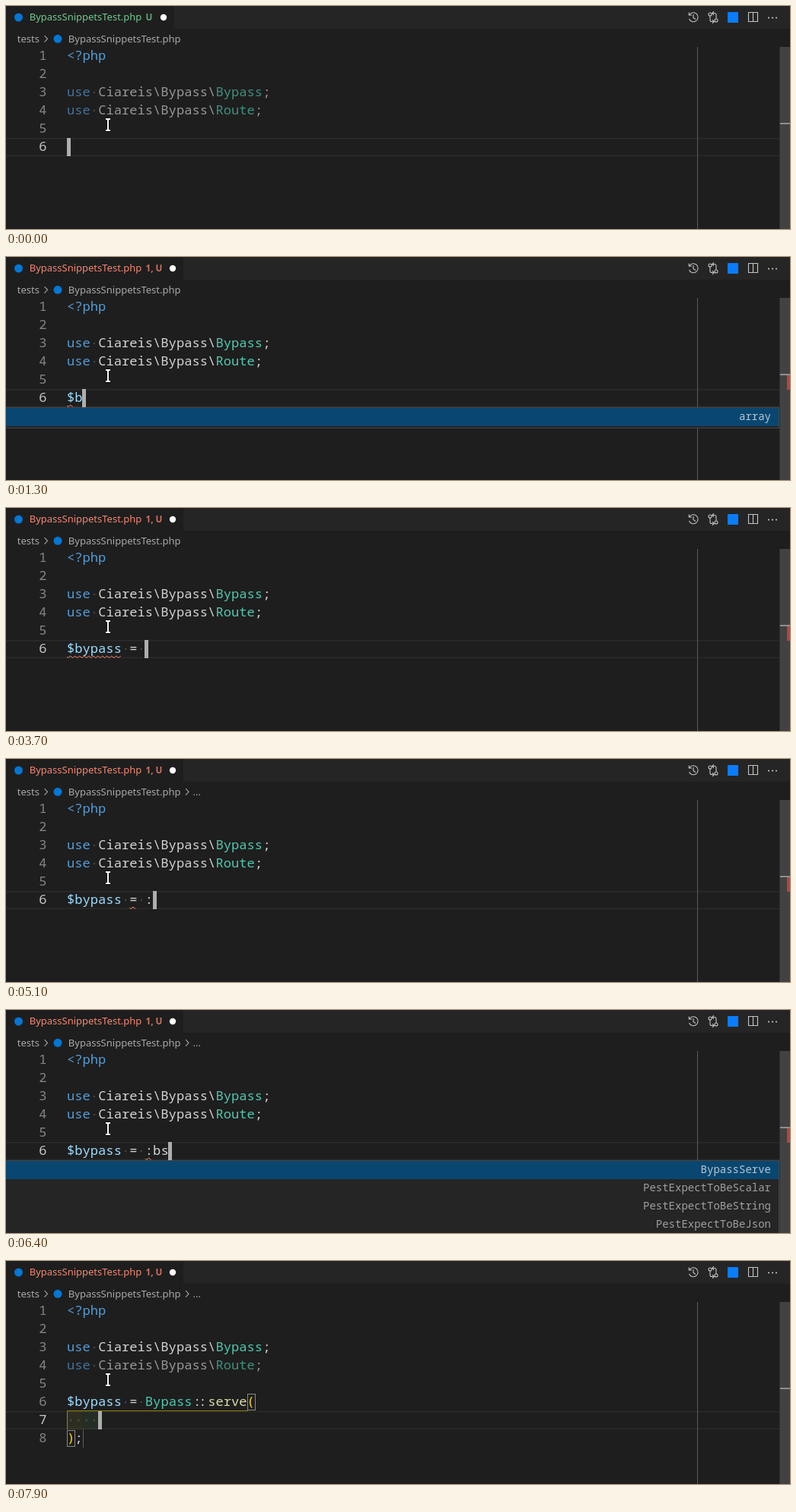
An HTML page with a canvas for the animation above (8 s loop, 1030 px wide and 294 px high).

```html
<!DOCTYPE html>
<html lang="en">
<head>
<meta charset="utf-8">
<title>Editor snippet</title>
<style>
html, body { margin: 0; width: 100%; height: 100%; overflow: hidden; background: #1e1e1e; }
canvas { display: block; }
</style>
</head>
<body>
<canvas id="stage" width="1030" height="294"></canvas>
<script>
const ctx = document.getElementById('stage').getContext('2d');
const LOOP = 8000, LEFT = 80, COL = 10.285, TOP = 54, ROW = 24, BASE = 17;
const CODE = '17.14px "Noto Sans Mono", monospace';
const LIST = '14px "Noto Sans Mono", monospace';
const UI = '13px "Noto Sans", sans-serif';
const BADGE = '600 11.7px "Noto Sans", sans-serif';
const C = {
  bg: '#1e1e1e', bar: '#252526', key: '#569cd6', text: '#d4d4d4', type: '#4ec9b0',
  variable: '#9cdcfe', call: '#dcdcaa', gold: '#ffd700', icon: '#c5c5c5',
  crumb: '#a9a9a9', error: '#f48771', added: '#73c991', logo: '#0277d4'
};

// Timelines: each entry holds from its time until the next one.
const typed = [
  [0, ''], [500, '$'], [1200, '$b'], [1500, '$by'], [2100, '$byp'], [2200, '$bypa'],
  [2400, '$bypas'], [2600, '$bypass'], [3300, '$bypass '], [3600, '$bypass ='],
  [3700, '$bypass = '], [5100, '$bypass = :'], [5800, '$bypass = :b'], [6400, '$bypass = :bs']
];
const waves = [[0, null], [1000, [0, 1]], [3100, [0, 7]], [4500, [8, 9]], [5600, [10, 11]], [7100, null]];
const routes = ['BypassRouteNotFound', 'BypassRouteOk', 'BypassServe'];
const menus = [
  [0, null],
  [600, { items: Array(4).fill('array') }],
  [1300, { items: ['array'] }],
  [1500, null],
  [5200, { items: [...routes, 'afterAll'], thumb: 45 }],
  [5800, { items: [...routes, 'beforeAll'], thumb: 70 }],
  [6400, { items: ['BypassServe', 'PestExpectToBeScalar', 'PestExpectToBeString', 'PestExpectToBeJson'] }],
  [7100, null]
];

const valueAt = (list, t) => list.filter(e => e[0] <= t).pop()[1];
const colX = n => LEFT + n * COL;
const rowY = line => TOP + (line - 1) * ROW;

function rect(x, y, w, h, color) {
  ctx.fillStyle = color;
  ctx.fillRect(x, y, w, h);
}

function text(s, x, y, font, color, align = 'left') {
  ctx.font = font;
  ctx.textAlign = align;
  ctx.fillStyle = color;
  ctx.fillText(s, x, y);
}

function disc(x, y, r, color) {
  ctx.fillStyle = color;
  ctx.beginPath();
  ctx.arc(x, y, r, 0, 7);
  ctx.fill();
}

function stroke(path, color = C.icon, width = 1.1) {
  ctx.strokeStyle = color;
  ctx.lineWidth = width;
  ctx.stroke(new Path2D(path));
}

function code(s, line, col, color) {
  text(s, colX(col), rowY(line) + BASE, CODE, color);
}

function spaceDot(line, col) {
  disc(colX(col + 0.5), rowY(line) + 12, 1.2, 'rgba(227,228,226,.2)');
}

function lineNumber(n, active) {
  text(n, 53.5, rowY(n) + BASE, CODE, active ? '#c6c6c6' : '#858585', 'right');
}

function importLine(line, name, dim) {
  ctx.globalAlpha = dim ? 0.667 : 1;
  code('use', line, 0, C.key);
  code('Ciareis\\Bypass\\', line, 4, C.text);
  code(name, line, 19, C.type);
  code(';', line, 19 + name.length, C.text);
  ctx.globalAlpha = 1;
  spaceDot(line, 3);
}

function statement(s) {
  code(s.slice(0, 7), 6, 0, C.variable);
  if (s.length > 7) spaceDot(6, 7);
  if (s.length > 8) code('=', 6, 8, C.text);
  if (s.length > 9) spaceDot(6, 9);
  code(s.slice(10), 6, 10, C.text);
}

function squiggle([from, to]) {
  const start = colX(from), end = colX(to);
  let path = `M${start} 196`;
  for (let x = start + 1.75, low = true; x <= end; x += 3, low = !low) path += `L${x} ${low ? 197.5 : 195.2}`;
  stroke(path, C.error, 1);
}

function tabBar(failing) {
  const end = failing ? 233 : 221, color = failing ? C.error : C.added;
  rect(0, 0, 1030, 30, C.bar);
  rect(0, 0, end, 30, C.bg);
  disc(16.5, 15, 5.5, C.logo);
  text('BypassSnippetsTest.php', 30.7, 19.3, UI, color);
  ctx.globalAlpha = 0.8;
  text(failing ? '1, U' : 'U', 183.5, 19, BADGE, color);
  ctx.globalAlpha = 1;
  disc(end - 14, 15, 4.2, '#fff');
}

function toolbar() {
  stroke('M898 11.5A6 6 0 1 1 897.5 17M897.3 8.5V12H901M903 11V15.5L906 17.5');
  stroke('M925 13V18.5Q925 20.5 927 20.5H929.5M928 18.2L930.3 20.5L928 22.8' +
         'M933 17V11.5Q933 9.5 931 9.5H928.5M930 7.2L927.7 9.5L930 11.8');
  stroke('M927 11A2 2 0 1 1 923 11A2 2 0 1 1 927 11M935 19A2 2 0 1 1 931 19A2 2 0 1 1 935 19');
  rect(948, 8, 14, 14, '#0a7cff');
  stroke('M975.5 8.5H987.5V20.5H975.5ZM981.5 8.5V20.5');
  for (const x of [1002, 1007, 1012]) disc(x, 15.5, 1.1, C.icon);
}

function breadcrumb(withSymbol) {
  const chevron = x => stroke(`M${x} 39L${x + 4} 43.3L${x} 47.6`, C.crumb);
  text('tests', 14.7, 47.6, UI, C.crumb);
  chevron(50.5);
  disc(68, 43.3, 5.5, C.logo);
  text('BypassSnippetsTest.php', 81.8, 47.6, UI, C.crumb);
  if (withSymbol) {
    chevron(236);
    text('...', 245.5, 47.6, UI, C.crumb);
  }
}

function currentLine(line) {
  const y = rowY(line);
  rect(0, y, 1016, 1.5, '#2b2b2b');
  rect(0, y + 22.5, 1016, 1.5, '#2b2b2b');
}

function overview(cursorY, failing) {
  rect(1016, 54, 14, 240, '#424242');
  rect(1016, 54, 1, 240, '#333');
  if (failing) rect(1026, 156, 4, 19, '#b9443f');
  rect(1017, cursorY - 1, 13, 2, '#8f8f8f');
}

function menu({ items, thumb }) {
  const height = items.length * ROW + 3;
  rect(0, 198, 1016, height + 1, '#454545');
  rect(0, 199, 1015, height - 1, C.bar);
  rect(0, 199, 1015, ROW, '#094771');
  items.forEach((item, i) => {
    const color = i ? 'rgba(212,212,212,.7)' : 'rgba(255,255,255,.7)';
    text(item, 1005, 215 + i * ROW, LIST, color, 'right');
  });
  if (thumb) rect(1005, 199, 10, thumb, 'rgba(121,121,121,.4)');
}

function bracketBox(line, col) {
  ctx.strokeStyle = '#888';
  ctx.lineWidth = 1;
  ctx.strokeRect(Math.ceil(colX(col)) + 0.5, rowY(line) + 1.5, 10, 21);
}

function snippet(t) {
  if (t >= 7500) {
    rect(LEFT, 198, 2 * COL, ROW, 'rgba(255,255,64,.07)');
    rect(colX(2), 198, 2 * COL, ROW, 'rgba(127,255,127,.07)');
  }
  statement('$bypass = ');
  code('Bypass', 6, 10, C.type);
  code(':', 6, 16.15, C.text);
  code(':', 6, 16.85, C.text);
  code('serve', 6, 18, C.call);
  code('(', 6, 23, C.gold);
  for (let i = 0; i < 4; i++) spaceDot(7, i);
  code(')', 8, 0, C.gold);
  code(';', 8, 1, C.text);
  rect(101, 222, 1, ROW, '#5c5c5c');
  if (t >= 7200) {
    rect(LEFT, 197, 238, 1, 'rgba(255,215,0,.5)');
    rect(LEFT, 198, 1, ROW, 'rgba(255,215,0,.5)');
    bracketBox(6, 23);
    bracketBox(8, 0);
  }
}

function pointer() {
  const beam = 'M131 149H133L134 150L135 149H137M134 150V163M131 164H133L134 163L135 164H137';
  stroke(beam, '#000', 4);
  stroke(beam, '#fff', 2);
}

function draw(t) {
  const checked = t >= 1000, inserted = t >= 7100, resolved = t >= 7900;
  const line = inserted ? 7 : 6, input = valueAt(typed, t);
  rect(0, 0, 1030, 294, C.bg);
  tabBar(checked);
  toolbar();
  breadcrumb(t >= 4100);
  currentLine(line);
  rect(908, 54, 1, 240, '#5a5a5a');
  for (let n = 1; n <= (inserted ? 8 : 6); n++) lineNumber(n, n === line);

  code('<?php', 1, 0, C.key);
  importLine(3, 'Bypass', !checked);
  importLine(4, 'Route', !checked || resolved);
  if (inserted) snippet(t);
  else statement(input);

  const wave = valueAt(waves, t);
  if (wave) squiggle(wave);
  rect(Math.floor(colX(inserted ? 4 : input.length)), rowY(line), 5, ROW, '#aeafad');
  overview(t >= 7200 ? 168 : 155, checked && !resolved);

  const open = valueAt(menus, t);
  if (open) menu(open);
  pointer();
}

function frame(now) {
  draw(now % LOOP);
  requestAnimationFrame(frame);
}
draw(0);
requestAnimationFrame(frame);
</script>
</body>
</html>
```
